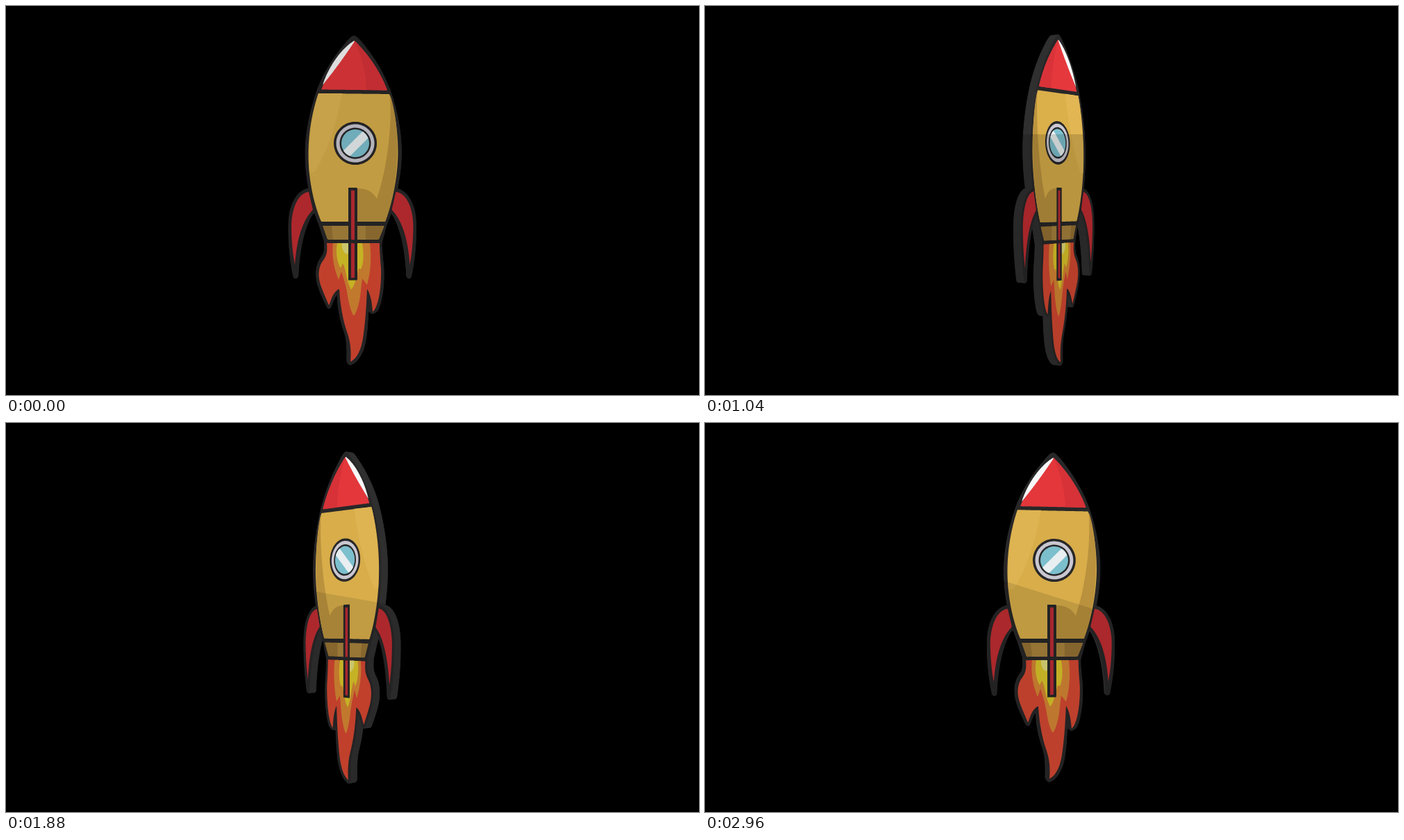
Write an HTML page with a canvas that moves like this. It is 998 by 561 pixels and loops after 3 s.

```html
<!DOCTYPE html>
<html lang="en">
<head>
<meta charset="utf-8">
<title>Turning rocket</title>
<style>
html, body { margin: 0; height: 100%; overflow: hidden; background: #000; }
canvas { display: block; }
</style>
</head>
<body>
<canvas id="stage" width="998" height="561"></canvas>
<script>
const ctx = document.getElementById('stage').getContext('2d');
const LOOP = 3000, STEPS = 72;
const AXIS = 499.5, MID = 280.5, EYE = 1400, BACK = -12.8;
const INK = '#292829', SIDE = '#323131';

// Turns an SVG path into a closed list of points.
function trace(d) {
  const path = document.createElementNS('http://www.w3.org/2000/svg', 'path');
  path.setAttribute('d', d);
  const length = path.getTotalLength(), n = Math.ceil(length / 2);
  return Array.from({ length: n }, (_, i) => {
    const p = path.getPointAtLength(length * i / n);
    return [p.x, p.y];
  });
}
const mirror = points => points.map(([x, y]) => [997.5 - x, y]);
const disc = r => trace(`M${503 - r} 198a${r} ${r} 0 1 1 ${2 * r} 0a${r} ${r} 0 1 1 ${-2 * r} 0Z`);
const box = (x, y, w, h) => trace(`M${x} ${y}h${w}v${h}h${-w}Z`);

const body = trace('M501.5 43C506 44 514 54 520 62C534 80 546 102 553 121C564 152 570 185 569.5 214C569 250 559 290 548 316L541 342H459L451 316C440 290 431 250 431 214C431 182 438 150 449 119C455 103 468 78 488 55C493 49 497 43 501.5 43Z');
const fin = trace('M438 263C420 264 408 285 407 312C406 345 410 372 414 391Q417 395 420 391C421 365 426 322 442 299L452 300L446 264Z');
const finRed = trace('M436 268C420 270 412 292 411 315C411 338 413 358 416 373C418 345 424 312 442 294Z');
const flame = trace('M458 340C459 350 459 356 453 364C445 375 445 392 450 406C454 418 459 427 462 434Q465 439 468 434C470 428 473 420 477 416C478 440 482 455 487 470C492 485 491 500 491 513Q493 519 498 517C510 511 517 495 519 475C521 462 521 450 522 440L527 444Q533 443 536 438C542 425 545 400 544 380C543 365 541 355 541 340Z');
const outlines = [flame, fin, mirror(fin), body];

const art = [
  ...outlines.map(shape => [INK, shape]),
  ['#c72e33', finRed],
  ['#c72e33', mirror(finRed)],
  // flame
  ['#dc4a33', trace('M462 342C463 354 462 360 456 368C449 378 449 392 454 405C458 416 462 424 465 432C468 424 471 412 480 408C481 430 485 452 491 470C497 487 497 500 496 513C508 507 513 490 515 472C518 450 519 430 520 408C526 418 527 430 528 441C537 434 541 402 540 378C539 365 538 355 538 342Z')],
  ['#dd8b35', trace('M471 342C469 360 472 378 479 395L483 383C486 392 490 404 492 418C494 430 497 442 501 447C506 440 510 424 511 410L513 393L520 402C526 380 526 360 524 342Z')],
  ['#e3cc2b', trace('M477 342C474 358 478 372 482 378L485 371C490 380 490 396 497 409C503 402 504 392 508 378L511 380C516 368 515 355 513 342Z')],
  ['#e9e27c', trace('M484 342Q483 352 490 358Q500 352 504 342Z')],
  // nose
  ['#ea393d', trace('M502 50C520 68 538 92 549 121.5L454 120.5L457 113Z')],
  ['#dd343a', trace('M502 50C520 68 538 92 549 121.5L519 121Q518 85 502 50Z')],
  ['#fff', trace('M501.5 50C483 61 464 88 456 114Q481 83 502 51Z')],
  // hull
  ['#dfb34c', trace('M450 126L552 127C560 150 564.5 182 564.5 212C564 248 556 285 546 311H454C443 285 435.5 250 435.5 214C435.5 182 441 152 450 126Z')],
  ['#e5ba55', trace('M450 126H484C478 160 466 205 444 240H437C434 200 441 152 450 126Z')],
  ['#c0963f', trace('M553 128C556 170 550 230 534 278Q526 263 506 263V311H546C554 290 560 262 562 236C566 190 561 150 553 128Z')],
  ['#9b7635', trace('M456 317H545L537 337H463Z')],
  ['#ad873e', trace('M469 317H518V337H471Z')],
  // slot
  [INK, box(493, 262, 13, 133.5)],
  ['#c22d35', box(497, 266, 5, 71)],
  ['#c22d35', box(497, 342, 5, 50)],
  // window
  [INK, disc(31)],
  ['#cfcdd8', disc(27.5)],
  [INK, disc(22.5)],
  ['#80c5d4', disc(20)],
  ['#f0f6f8', trace('M486 208.5L513.5 181A20 20 0 0 1 521.5 190.5L495.5 216.5A20 20 0 0 1 486 208.5Z')]
];

// Reflected horizon: angle, shade above, shade below, height at x = 400 and x = 600.
const light = [
  [0, .13, .13, 240, 260],
  [70, .21, .04, 340, 340],
  [125, .02, .17, 185, 185],
  [165, .04, .19, -112, 322],
  [225, .03, .13, 235, 270],
  [280, 0, .15, 185, 185],
  [355, .03, .14, 218, 281],
  [360, .13, .13, 240, 260]
];
function lightAt(deg) {
  const i = light.findIndex(key => key[0] > deg), a = light[i - 1], b = light[i];
  const u = (deg - a[0]) / (b[0] - a[0]);
  return a.map((v, j) => v + (b[j] - v) * u);
}

function fill(points, color) {
  ctx.beginPath();
  points.forEach(p => ctx.lineTo(p[0], p[1]));
  ctx.closePath();
  ctx.fillStyle = color;
  ctx.fill();
}

function draw(deg) {
  const a = deg * Math.PI / 180, cos = Math.cos(a), sin = Math.sin(a);
  const project = z => ([x, y]) => {
    const dx = x - AXIS, s = EYE / (EYE - dx * sin - z * cos);
    return [AXIS + (dx * cos - z * sin) * s, MID + (y - MID) * s];
  };
  const front = project(0), back = project(BACK);
  const face = cos > -.005 ? front : back;

  ctx.fillStyle = '#000';
  ctx.fillRect(0, 0, 998, 561);

  // extruded edge
  ctx.strokeStyle = SIDE;
  ctx.lineWidth = .6;
  for (const shape of outlines) {
    const near = shape.map(front), far = shape.map(back);
    fill(face === front ? far : near, SIDE);
    near.forEach((p, i) => {
      const j = (i + 1) % near.length;
      fill([p, near[j], far[j], far[i]], SIDE);
      ctx.stroke();
    });
  }

  for (const [color, shape] of art) fill(shape.map(face), color);

  const [, above, below, left, right] = lightAt(deg);
  fill([[400, Math.min(left, 0)], [600, 0], [600, right], [400, left]], `rgba(0,0,0,${above})`);
  fill([[400, left], [600, right], [600, 561], [400, 561]], `rgba(0,0,0,${below})`);
}

let shown = -1;
function tick(now) {
  // 24 poses a second, each starting on the nearest 10 ms
  const step = Math.floor((now % LOOP + 4) * STEPS / LOOP) % STEPS;
  if (step !== shown) draw(step * 360 / STEPS);
  shown = step;
  requestAnimationFrame(tick);
}
tick(performance.now());
</script>
</body>
</html>
```
